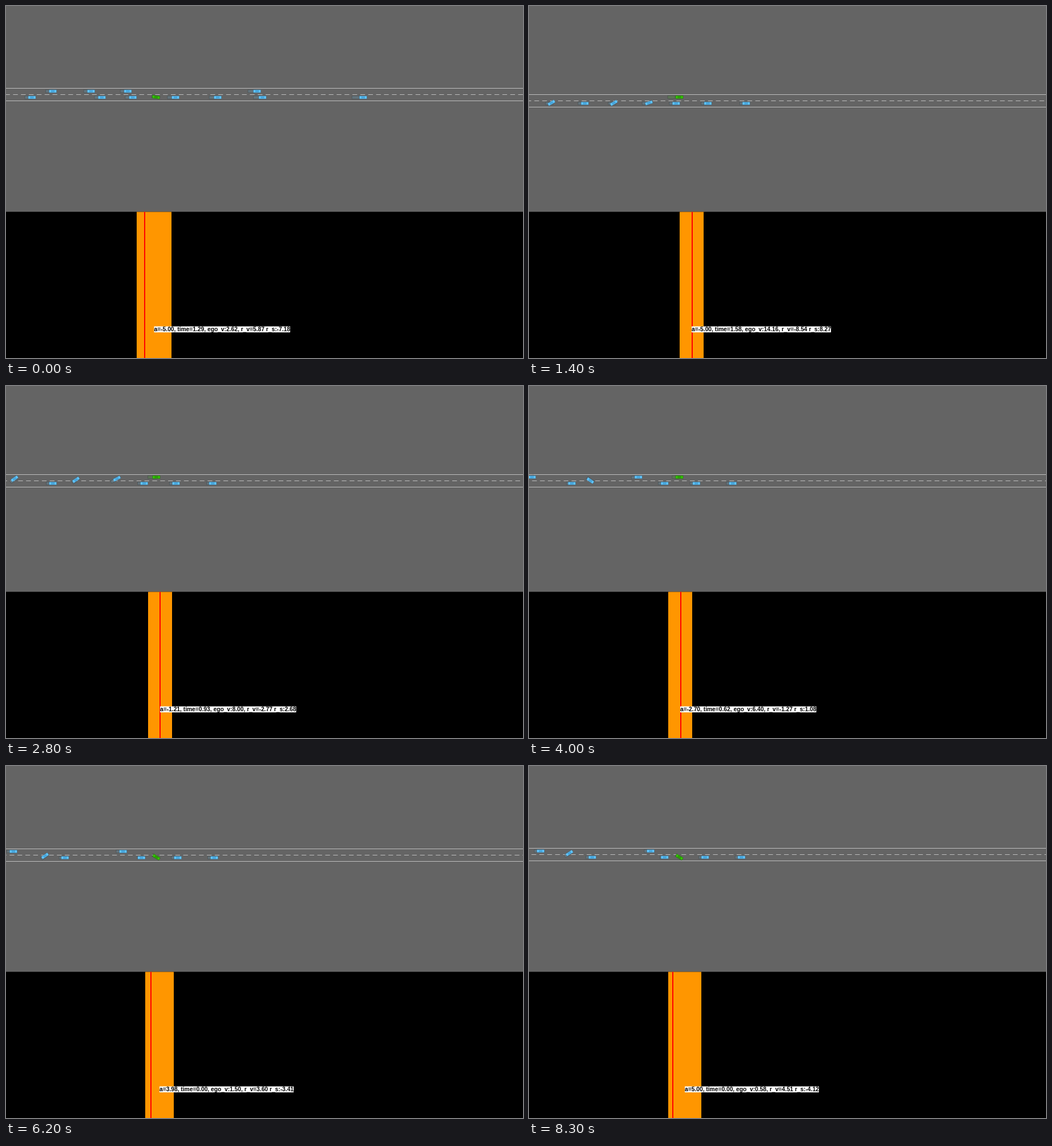
Animation, 906 px wide and 618 px high, one loop 8400 ms. Source, as an HTML page with a canvas:

```html
<!DOCTYPE html>
<html lang="en">
<head>
<meta charset="utf-8">
<title>Lane change simulation</title>
<style>
  html, body { margin: 0; width: 100%; height: 100%; overflow: hidden; background: #000; }
  canvas { display: block; }
</style>
</head>
<body>
<canvas id="stage" width="906" height="618"></canvas>
<script>
const ctx = document.getElementById('stage').getContext('2d');
const W = 906, H = 618, SPLIT = 361.5, LOOP = 8400;
const EGO_X = 263.5, EGO_Y = 160, LANE = 11, LOWER = 16;
const SCALE = 2.766;            // pixels per metre
const SLOWDOWN = 1500;          // ms shown per simulated second
const TRAIL = 500;
const LINE = '#bebebe';
const BLUE = { body: '#64c8ff', roof: '#46a5dc', edge: '#2f5f7c' };
const GREEN = { body: '#32c800', roof: '#2a9a08', edge: '#1d5208' };

const range = (from, to, by) => Array.from({ length: (to - from) / by + 1 }, (_, i) => from + i * by);

// The picture holds between these moments
const steps = [...range(500, 2500, 100), 2800, 3100, 3300, 3600, ...range(4000, 5800, 300), 6200, 6500, 6900, 7200];

function lerp(points, t) {
  const i = points.findIndex(p => p[0] >= t);
  if (i === 0) return points[0][1];
  if (i < 0) return points[points.length - 1][1];
  const [t0, a] = points[i - 1], [t1, b] = points[i];
  return a + (b - a) * (t - t0) / (t1 - t0);
}

function ease(t, from, to) {
  const u = Math.min(1, Math.max(0, (t - from) / (to - from)));
  return u * u * (3 - 2 * u);
}

const bump = (t, from, to) => t <= from || t >= to ? 0 : Math.sin(Math.PI * (t - from) / (to - from)) ** 2;

// Planner read-outs
const accel = t => t < 870 ? 5 : lerp([[2500, -5], [2800, -1.21], [4000, -2.7], [6200, 3.98], [6700, 5]], t);
const timeLeft = t => lerp([[500, 2.08], [700, 1.97], [1400, 1.58], [2800, .93], [4000, .62], [6200, 0]], t);
const target = t => lerp([[500, 14], [700, 12.75], [1400, 8.27], [2800, 2.68], [4000, 1.08], [6200, -3.41], [7200, -4.12]], t);

const egoSpeed = t => lerp([[500, 14.5], [900, 16.14], [1400, 14.16], [2100, 11.8], [2800, 8],
  [4000, 6.4], [4900, 2.9], [6200, 1.5], [7200, .58]], t);
const leadSpeed = t => 5.09 + 1.03 * Math.exp((700 - t) / 1050);

// Distance in pixels covered at the given speed, zero at 700 ms
function distance(speed) {
  const path = [[0, 0]];
  for (const t of range(100, 7400, 100)) {
    const mean = (speed(t - 100) + speed(t)) / 2;
    path.push([t, path[path.length - 1][1] + mean * SCALE * 100 / SLOWDOWN]);
  }
  const zero = path[7][1];
  return t => lerp(path, t) - zero;
}
const travel = distance(egoSpeed);
const flow = distance(t => leadSpeed(t) - egoSpeed(t));

// The view follows the ego car, so its lane change moves the road
const settle = (t, tau) => t < 4100 ? 0 : 1 - Math.exp((4100 - t) / tau);
const roadTop = t => 155 - LANE * settle(t, 900);
const egoTurn = t => .56 * settle(t, 500);

// drift: how far a car falls behind the flow; up: part of the lane change done
const merge = (from, to) => t => ease(t, from, to);
const stay = () => 0;
const cars = [
  { x: 53.5, drift: [-16, 600, 4200], up: merge(900, 3700) },
  { x: 110, drift: [-23, 3000, 7800], up: merge(4800, 8700) },
  { x: 164, drift: [-36, 300, 6300], up: t => .62 * bump(t, 900, 5500) },
  { x: 222.3, drift: [8, 2800, 6800], up: merge(900, 3700) },
  { x: 270, drift: [-16, 4800, 7600], up: stay },
  { x: 325.7, drift: [0, 0, 1], up: stay },
  { x: 393.5, drift: [-4, 600, 3600], up: stay }
];
const [rearCar, frontCar] = cars.slice(4);

const carX = ({ x, drift: [size, from, to] }, t) => x + flow(t) + size * ease(t, from, to);
const carY = (car, t) => LOWER - LANE * car.up(t);

// A car points along its path over the ground
function carTurn(car, t) {
  const a = t - 100, b = t + 100;
  const dx = carX(car, b) - carX(car, a) + travel(b) - travel(a);
  const angle = Math.atan2(carY(car, b) - carY(car, a), Math.abs(dx));
  return Math.max(-.6, Math.min(.6, angle));
}

function rect(x, y, w, h, color) {
  ctx.fillStyle = color;
  ctx.fillRect(x, y, w, h);
}

function drawCar(x, y, angle, paint, ghost) {
  const l = 13, w = 5;
  ctx.save();
  ctx.translate(x, y);
  ctx.rotate(angle);
  ctx.globalAlpha = ghost ? .15 : 1;
  rect(-l / 2, -w / 2, l, w, paint.body);
  if (!ghost) rect(-l / 4, -w / 2 + .8, l / 2, w - 1.6, paint.roof);
  ctx.globalAlpha = ghost ? .5 : .6;
  ctx.strokeStyle = ghost ? '#303a3c' : paint.edge;
  ctx.lineWidth = .7;
  ctx.strokeRect(-l / 2, -w / 2, l, w);
  ctx.restore();
}

function drawRoad(top, phase) {
  const y = Math.round(top), gap = 5 * SCALE;
  rect(0, 0, W, SPLIT, '#646464');
  rect(0, y, W, 1, LINE);
  rect(0, y + 2 * LANE, W, 1, LINE);
  for (let x = phase % gap - gap; x < W; x += gap) rect(x, y + LANE, 3 * SCALE, 1, LINE);
}

function drawGap(rear, front, { a, time, v, rv, s }) {
  const left = Math.round(rear + 6.7), right = Math.round(front - 7), mid = (left + right) / 2;
  rect(0, SPLIT, W, H - SPLIT, '#000');
  rect(left, SPLIT, right - left, H - SPLIT, '#ff9600');
  rect(Math.round(EGO_X - 1.5 + 2.75 * s), SPLIT, 2, H - SPLIT, '#f00');
  const f = n => n.toFixed(2);
  const label = `a=${f(a)}, time=${f(time)}, ego_v:${f(v)}, r_v=${f(rv)} r_s:${f(s)}`;
  ctx.font = 'bold 10.25px "Liberation Sans", Arial, sans-serif';
  rect(mid, 562.5, ctx.measureText(label).width, 10.5, '#fff');
  ctx.fillStyle = '#000';
  ctx.fillText(label, mid, 571);
}

function drawOpening() {
  drawRoad(144, 12.4);
  const place = (y, xs) => xs.map(x => [x, y]);
  const traffic = [
    ...place(149.6, [82, 149, 213.5, 440]),
    ...place(160.5, [45.5, 168, 222.3, 297, 371, 449.5, 625.8])
  ];
  for (const [x, y] of traffic) {
    drawCar(x - 6 - (x / 235) ** 2, y, 0, BLUE, true);
    drawCar(x, y, 0, BLUE);
  }
  drawCar(EGO_X - 2, EGO_Y - .5, .14, GREEN, true);
  drawCar(EGO_X - .5, EGO_Y, .14, GREEN);
  drawGap(222.5, 297, { a: -5, time: 1.29, v: 2.62, rv: 5.87, s: -7.18 });
}

function drawTraffic(t) {
  const top = roadTop(t), past = t - TRAIL;
  drawRoad(top, 1.5 - travel(t));
  if (past >= steps[0]) {
    const back = travel(t) - travel(past);
    for (const car of cars) {
      drawCar(carX(car, past) - back, top + carY(car, past), carTurn(car, past), BLUE, true);
    }
    drawCar(EGO_X - back, EGO_Y + top - roadTop(past), egoTurn(past), GREEN, true);
  }
  for (const car of cars) drawCar(carX(car, t), top + carY(car, t), carTurn(car, t), BLUE);
  drawCar(EGO_X, EGO_Y, egoTurn(t), GREEN);

  const v = egoSpeed(t);
  drawGap(carX(rearCar, t), carX(frontCar, t),
    { a: accel(t), time: timeLeft(t), v, rv: leadSpeed(t) - v, s: target(t) });
}

const start = performance.now();
function frame() {
  const t = (performance.now() - start) % LOOP;
  if (t < steps[0]) drawOpening();
  else drawTraffic(steps.filter(s => s <= t).pop());
  requestAnimationFrame(frame);
}
frame();
</script>
</body>
</html>
```
